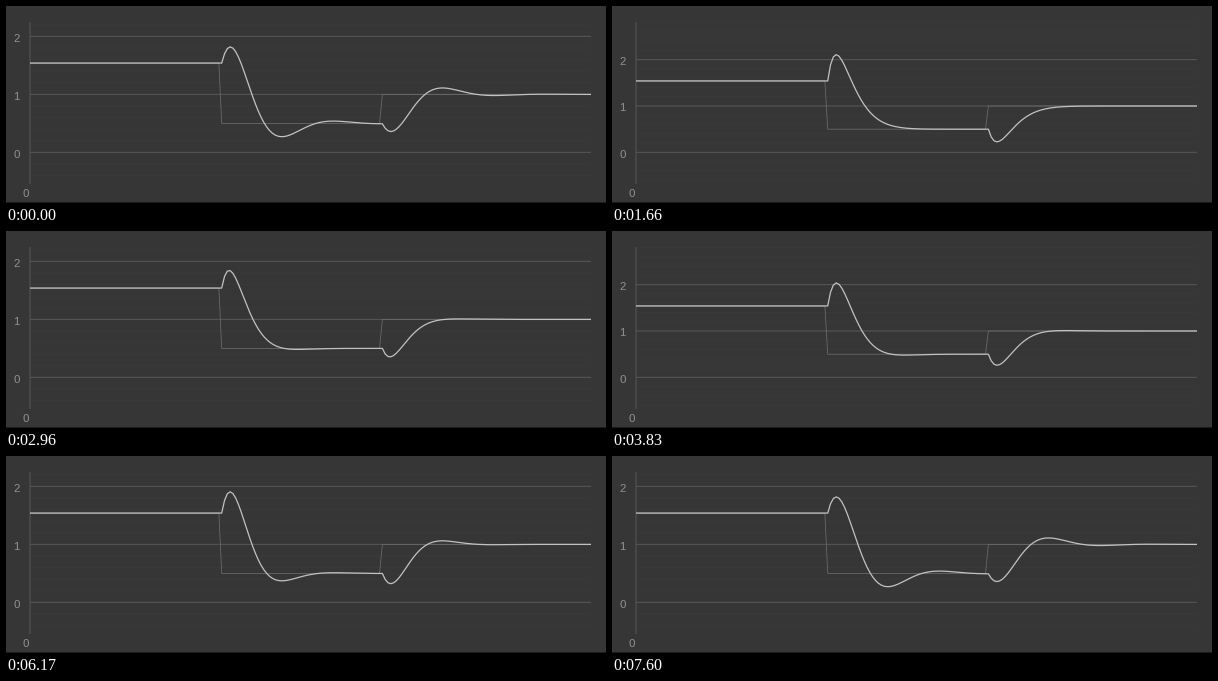
Animation, 600 px wide and 197 px high, one loop 8370 ms. Source, as a matplotlib script:

```python
import math

import numpy as np
import matplotlib.pyplot as plt
from matplotlib.animation import FuncAnimation

W, H, DPI = 600, 197, 100
LOOP, STEP = 8370, 30
MIRROR = 8390             # the second half plays the first one backwards

LEFT, RIGHT = 24, 585
TOP, BOTTOM, ZERO = 16, 178, 146.4
SAMPLES, DROP, RISE = 200, 68, 125
X = np.linspace(LEFT, RIGHT, SAMPLES)
DX = X[1] - X[0]

INPUT = np.full(SAMPLES, 1.0)
INPUT[:RISE] = 0.5
INPUT[:DROP] = 1.54

# keyframes: time in ms, value
OMEGA = [(790, .0664), (980, .09), (1170, .0715)]
ZETA = [(1655, .465), (1656, .856), (1695, .856), (1735, 2.07), (1800, 2.15),
        (2195, .57), (2220, .57), (2330, .745)]
RESPONSE = [(2610, -2.17), (2790, -0.9), (2960, -1.56), (3045, -2.17)]


def at(keys, t):
    times, values = zip(*keys)
    return float(np.interp(t, times, values))


def simulate(w, zeta, r):
    """Second-order system following INPUT, semi-implicit Euler."""
    k1, k3 = 2 * zeta / w, r * zeta / w
    k2 = max(1 / w ** 2, DX * k1, DX * (DX + k1) / 2)
    y, v, prev = INPUT[0], 0.0, INPUT[0]
    out = np.empty(SAMPLES)
    for i, x in enumerate(INPUT):
        slope = (x - prev) / DX
        prev = x
        y += DX * v
        v += DX * (x + k3 * slope - y - k1 * v) / k2
        out[i] = y
    return out


def px(width):
    return width * 72 / DPI


fig = plt.figure(figsize=(W / DPI, H / DPI), dpi=DPI, facecolor="#363636")
ax = fig.add_axes([0, 0, 1, 1])
ax.set_xlim(0, W)
ax.set_ylim(H, 0)
ax.axis("off")


def line(color, width, z, xs=(), ys=()):
    return ax.plot(xs, ys, color=color, lw=px(width), zorder=z, snap=False,
                   solid_capstyle="butt", solid_joinstyle="round")[0]


def label(x, y, text):
    return ax.text(x, y, text, color="#909090", fontsize=px(11.5),
                   family="Liberation Sans", ha="center",
                   va="center_baseline")


line("#1c1c1c", 1, 1, (0, W), (196.5, 196.5))
line("#565656", 1, 3, (LEFT, LEFT), (TOP, BOTTOM))
label(19.7, 186.7, "0")

minor = line("#3a3a3a", 1, 1)
major = [line("#525252", 1.2, 2) for _ in range(4)]
marks = [label(10.4, 0, str(n)) for n in range(4)]
target = line("#6a6a6a", 0.8, 4)
curve = line("#c2c2c2", 1.25, 5)


def draw(i):
    t = i * STEP + STEP * 2 / 3
    if t > MIRROR / 2:
        t = MIRROR - t
    values = simulate(at(OMEGA, t), at(ZETA, t), at(RESPONSE, t))
    top = max(2, math.ceil(values.max() * 2) / 2)
    unit = 116 / top

    def ypos(value):
        return ZERO - unit * value

    ticks = [ypos(n / 5) for n in range(-4, 18)]
    ticks = [y for y in ticks if TOP <= y <= BOTTOM]
    minor.set_data(np.tile([LEFT, RIGHT, np.nan], len(ticks)),
                   np.repeat(ticks, 3))
    for n, (rule, mark) in enumerate(zip(major, marks)):
        rule.set_data((LEFT, RIGHT), (ypos(n), ypos(n)))
        mark.set_y(ypos(n) + 1.2)
        rule.set_visible(n <= top)
        mark.set_visible(n <= top)
    target.set_data(X, ypos(INPUT))
    curve.set_data(X, ypos(values))
    return [minor, *major, *marks, target, curve]


anim = FuncAnimation(fig, draw, frames=LOOP // STEP, interval=STEP,
                     repeat=True, repeat_delay=0, blit=False)
plt.show()
```
